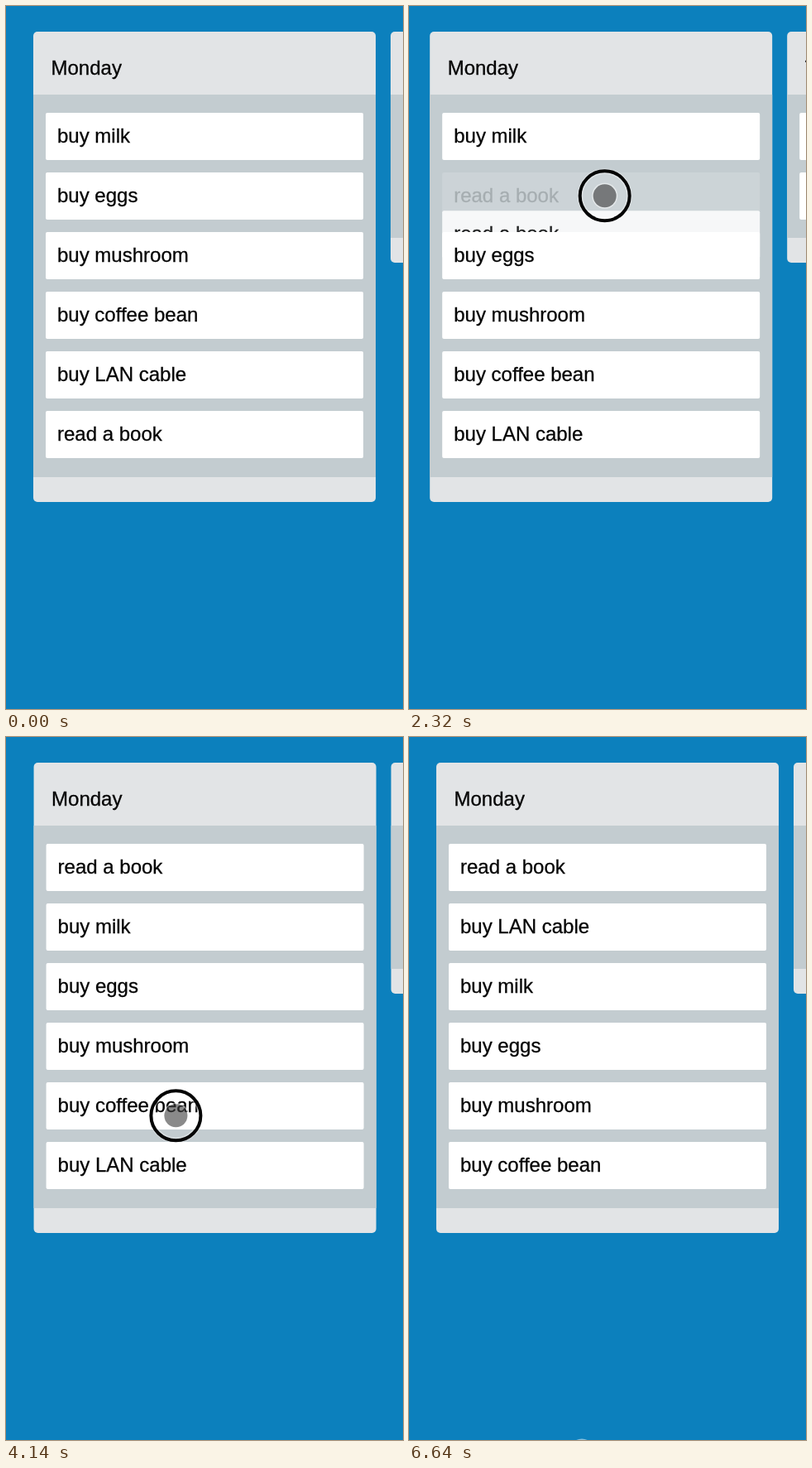
Recreate the animation shown at these times as an HTML page. Size 480x849 px, loop 6780 ms.

```html
<!DOCTYPE html>
<html lang="en">
<head>
<meta charset="utf-8">
<title>Task board</title>
<style>
html, body { margin: 0; width: 100%; height: 100%; overflow: hidden; background: #0c80bd; }
body { position: relative; font: 24px "Liberation Sans", Arial, sans-serif; color: #050505;
  -webkit-text-stroke: .3px; white-space: nowrap; }
#board, .panel, .body, .card, #cursor { position: absolute; }
#board { left: 0; top: 31px; }
.panel { width: 414px; height: 567.5px; border-radius: 5px; background: #e2e4e6; }
.panel.next { left: 432px; height: 279px; }
.title { padding-left: 21.5px; line-height: 88px; }
.body { left: 0; top: 75.5px; width: 100%; height: 462px; background: #c3ccd0; }
.next .body { height: 173.5px; }
.card { left: 15px; top: 0; width: 384px; height: 57px; padding-left: 14px; box-sizing: border-box;
  line-height: 55px; border-radius: 2px; background: #fff; }
#lifted { opacity: .85; }
#cursor { left: -14px; top: -14px; width: 28px; height: 28px; border-radius: 50%;
  background: rgba(60, 60, 60, .6); box-shadow: 0 0 0 1.5px rgba(255, 255, 255, .5); }
#ring { position: absolute; left: -18px; top: -18px; width: 56px; height: 56px; border: 4px solid #050505;
  border-radius: 50%; box-shadow: 0 0 0 1px rgba(255, 255, 255, .4), inset 0 0 0 1.5px rgba(255, 255, 255, .4); }
</style>
</head>
<body>
<div id="board">
  <div class="panel"><div class="title">Monday</div><div class="body" id="list"></div></div>
  <div class="panel next"><div class="title">Tuesday</div><div class="body" id="nextList"></div></div>
</div>
<div id="cursor"><div id="ring"></div></div>
<script>
const LOOP = 6780, LAG = 50, SETTLE = 300, REST_X = 33, PITCH = 72, FIRST_TOP = 22, LIST_TOP = 106.5;
const tasks = ['buy milk', 'buy eggs', 'buy mushroom', 'buy coffee bean', 'buy LAN cable', 'read a book'];

const entry = { x: 496, y: 560 };
const moves = [
  { from: 90, to: 950, x: 245, y: 497 },
  { from: 1320, to: 1700, x: 240.5, y: 415.5 },
  { from: 1780, to: 2700, x: 234.5, y: 123 },
  { from: 3100, to: 3950, x: 204, y: 498 },
  { from: 4007, to: 4558, x: 214, y: 205 },
  { from: 4800, to: 5207, x: 206, y: 205 },
  { from: 5207, to: 6330, x: 209, y: 863 }
];
const drags = [
  { press: 1320, lift: 1400, release: 2950, grip: 7 },
  { press: 4007, lift: 4150, release: 5400, grip: 1 }
];

const clamp = (v, low, high) => Math.max(low, Math.min(high, v));
const ease = u => (1 - Math.cos(Math.PI * u)) / 2;

function pointer(t) {
  let { x, y } = entry;
  for (const m of moves) {
    const k = ease(clamp((t - m.from) / (m.to - m.from), 0, 1));
    x += (m.x - x) * k;
    y += (m.y - y) * k;
  }
  return { x, y };
}

// The board reacts to the pointer a moment late and stops following on release
const seen = (drag, t) => pointer(Math.min(t, drag.release) - LAG);

function boardX(t) {
  return drags.reduce((x, d) => {
    if (t < d.press) return x;
    const hold = 1 - clamp((t - d.release) / SETTLE, 0, 1);
    return x + (seen(d, t).x - pointer(d.press).x) * hold ** 2;
  }, REST_X);
}

const $ = id => document.getElementById(id);
function addCard(parent, text) {
  const card = document.createElement('div');
  card.className = 'card';
  card.textContent = text;
  parent.append(card);
  return card;
}
const place = (el, x, y) => { el.style.transform = `translate(${x}px, ${y}px)`; };
const slotTop = slot => FIRST_TOP + slot * PITCH;
const slotAt = y => clamp(Math.ceil((y - 186) / PITCH), 0, tasks.length - 1);

const cards = tasks.map(text => addCard($('list'), text));
const lifted = addCard($('list'), '');
lifted.id = 'lifted';
['call the bank', 'clean the desk'].forEach((text, i) => place(addCard($('nextList'), text), 0, slotTop(i)));

function draw(t) {
  const order = tasks.map((_, i) => i);
  let active = null, ghost = -1, slot = 0;
  for (const drag of drags) {
    if (t < drag.lift) break;
    const id = order.pop();
    slot = slotAt(seen(drag, t).y);
    order.splice(slot, 0, id);
    if (t < drag.release) { active = drag; ghost = id; }
  }
  order.forEach((id, i) => {
    place(cards[id], 0, slotTop(i));
    cards[id].style.zIndex = i * 2;
    cards[id].style.opacity = id === ghost ? .15 : 1;
  });
  lifted.style.display = active ? '' : 'none';
  if (active) {
    lifted.textContent = tasks[ghost];
    lifted.style.zIndex = slot * 2 + 1;
    place(lifted, 0, seen(active, t).y - active.grip - LIST_TOP);
  }
  const { x, y } = pointer(t);
  place($('board'), boardX(t), 0);
  place($('cursor'), x, y);
  $('ring').style.display = drags.some(d => t >= d.press && t < d.release) ? '' : 'none';
}

const start = performance.now();
function tick() {
  draw((performance.now() - start) % LOOP);
  requestAnimationFrame(tick);
}
tick();
</script>
</body>
</html>
```
